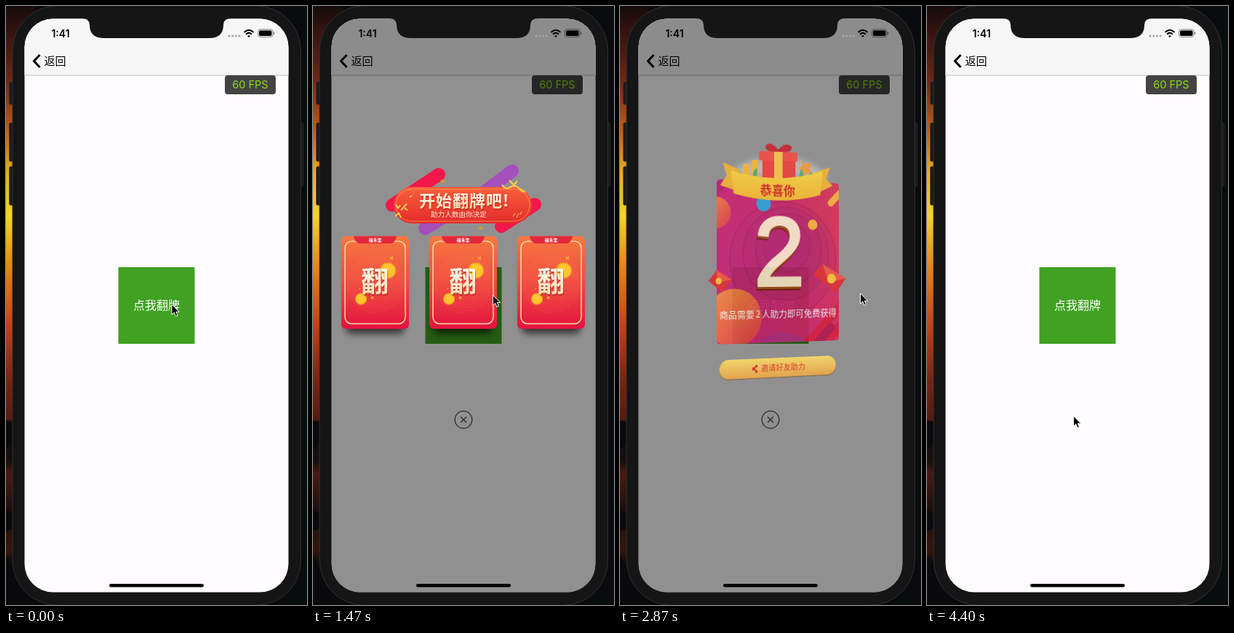
An HTML page that plays this animation: 414 by 821 pixels, repeating every 4470 ms.

```html
<!DOCTYPE html>
<html lang="zh">
<head>
<meta charset="utf-8">
<style>
html, body { margin: 0; width: 100%; height: 100%; overflow: hidden; background: #0a0a0b; }
body { position: relative; font-family: "Noto Sans CJK SC", "Noto Sans CJK", "Noto Sans", sans-serif; }
div, svg { position: absolute; left: 0; top: 0; width: 414px; height: 821px; }
.screen { clip-path: inset(17.5px 25.5px 17.5px 25.5px round 39px); background: #fefcff; }
#dim { background: #000; }
#front { transform-origin: 327.5px 379px; }
#prize { transform-origin: 207px 344px; }
.latin { font-family: Inter, Roboto, sans-serif; }
</style>
</head>
<body>
<svg id="phone">
  <defs>
    <linearGradient id="fire" x2="0" y2="1">
      <stop offset="0" stop-color="#150c0c"/><stop offset=".05" stop-color="#3a1510"/>
      <stop offset=".12" stop-color="#6a2614"/><stop offset=".2" stop-color="#b4581a"/>
      <stop offset=".28" stop-color="#e9ae22"/><stop offset=".35" stop-color="#f3d32a"/>
      <stop offset=".43" stop-color="#e58a1c"/><stop offset=".53" stop-color="#c2451a"/>
      <stop offset=".62" stop-color="#7a2613"/><stop offset=".69" stop-color="#571a10"/>
      <stop offset=".695" stop-color="#0d0d10"/><stop offset=".76" stop-color="#17100f"/>
      <stop offset=".78" stop-color="#4a1a10"/><stop offset=".84" stop-color="#1c0f0e"/>
      <stop offset=".91" stop-color="#33160d"/><stop offset=".93" stop-color="#0b0b0d"/>
    </linearGradient>
    <linearGradient id="cardFill" x2="0" y2="1">
      <stop offset="0" stop-color="#f7783f"/><stop offset=".5" stop-color="#f24b41"/><stop offset="1" stop-color="#e4123f"/>
    </linearGradient>
    <linearGradient id="cream" x2="0" y2="1">
      <stop offset=".2" stop-color="#fffaf0"/><stop offset="1" stop-color="#ffd9a8"/>
    </linearGradient>
    <linearGradient id="pill" x2="0" y2="1">
      <stop offset="0" stop-color="#f9603c"/><stop offset="1" stop-color="#e22a2b"/>
    </linearGradient>
    <linearGradient id="gold" x2="0" y2="1">
      <stop offset="0" stop-color="#ffdf62"/><stop offset="1" stop-color="#eda644"/>
    </linearGradient>
    <linearGradient id="ribbon" x2="0" y2="1">
      <stop offset="0" stop-color="#fdd63a"/><stop offset="1" stop-color="#f7b92c"/>
    </linearGradient>
    <linearGradient id="panel" x2="1" y2="-.3">
      <stop offset="0" stop-color="#c91f74"/><stop offset=".5" stop-color="#cf2160"/><stop offset="1" stop-color="#df3550"/>
    </linearGradient>
    <linearGradient id="sun" x2="1" y2="1">
      <stop offset="0" stop-color="#f9953a"/><stop offset="1" stop-color="#e32d4a"/>
    </linearGradient>
    <pattern id="dots" width="3" height="3" patternUnits="userSpaceOnUse" patternTransform="rotate(45)">
      <circle cx="1.5" cy="1.5" r=".6" fill="#ffb070"/>
    </pattern>
    <filter id="blur" x="-50%" y="-50%" width="200%" height="200%"><feGaussianBlur stdDeviation="5"/></filter>
    <clipPath id="panelClip"><rect x="113" y="232" width="188" height="229" rx="5"/></clipPath>

    <g id="card">
      <rect x="6" y="20" width="81" height="114" rx="8" fill="#000" opacity=".6" filter="url(#blur)"/>
      <rect width="93" height="127" rx="6" fill="url(#cardFill)"/>
      <circle cx="47" cy="66" r="40" fill="url(#dots)" opacity=".45"/>
      <rect x="5" y="7" width="83" height="113" rx="9" fill="none" stroke="#ffdba6" stroke-width="1.5"/>
      <path d="M17 0H76Q74 10 67 10H26Q19 10 17 0Z" fill="#e3263a"/>
      <text x="46.5" y="7.8" font-size="6" font-weight="700" fill="#fff" text-anchor="middle">福禾里</text>
      <g fill="#ffc52e" stroke="#f59a20" stroke-width="1.5">
        <circle cx="64" cy="47" r="10.5"/><circle cx="27" cy="86" r="7.5"/>
      </g>
      <path d="M67 28l4 4m0-4l-4 4M41 83l3 3m0-3l-3 3M59 30h1M25 72h1" stroke="#ffb52e" stroke-width="1.3"/>
      <text x="47" y="77" font-size="38" font-weight="700" fill="#a32516" opacity=".55" text-anchor="middle">翻</text>
      <text x="46" y="75.5" font-size="38" font-weight="700" fill="url(#cream)" text-anchor="middle">翻</text>
    </g>
  </defs>
  <rect width="40" height="821" fill="url(#fire)"/>
  <path d="M0 568l9 4v28l-9 8M0 690l9 6v20l-9 4M0 752l30 69H0Z" fill="#0a0a0c"/>
  <rect x="374" width="40" height="821" fill="#080c0d"/>
  <g fill="#1b1b1c" stroke="#303031" stroke-width=".6">
    <rect x="4.500" y="104" width="8" height="31" rx="2"/><rect x="4.500" y="160" width="8" height="53" rx="2"/>
    <rect x="4.500" y="220" width="8" height="53" rx="2"/><rect x="401" y="160" width="8" height="87" rx="2"/>
  </g>
  <rect x="9" y="-.5" width="396.500" height="822" rx="62" fill="#151516" stroke="#303032"/>
</svg>

<div class="screen">
  <svg id="page">
    <rect y="17" width="414" height="78" fill="#f6f6f6"/>
    <path d="M0 95H414" stroke="#bdbdbf"/>
    <path d="M46.500 67L38.500 75.500L46.500 84" fill="none" stroke="#000" stroke-width="3"/>
    <text x="52.500" y="81.300" font-size="15">返回</text>
    <rect x="154.500" y="358" width="105" height="105" fill="#40a122"/>
    <text x="207" y="416" font-size="16" font-weight="300" fill="#fff" text-anchor="middle">点我翻牌</text>
    <rect x="301" y="95" width="70" height="26" rx="4" fill="#434344"/>
    <text class="latin" x="336" y="113.300" font-size="14.500" fill="#8ede0c" text-anchor="middle">60 FPS</text>
  </svg>
  <div id="dim"></div>
  <div id="popup">
    <svg id="deal">
      <g stroke-linecap="round" stroke-width="18">
        <path d="M109 273L173 231M259 302L305 272" stroke="#f5164a"/>
        <path d="M230 259L274 226M154 305L190 283" stroke="#a350bb"/>
      </g>
      <rect x="111" y="248" width="190" height="50" rx="25" fill="url(#pill)"/>
      <rect x="114" y="251" width="184" height="44" rx="22" fill="none" stroke="#ff9b50" stroke-width=".8"/>
      <g fill="none" stroke="#ffcf4a" stroke-width="2">
        <path d="M260 245q5 8 12 3t16 7M270 239l6 6l5-5M284 250l8 5"/>
        <path d="M114 272l3 5l3-4M121 280l8-9M113 288l5-4l3 6M126 277l4 3M133 262l3-2"/>
        <path d="M275 289l3-5m2 6l3-6m2 2l2-4" stroke-width="1"/>
      </g>
      <path d="M176 239h5v3h-5zM228 303h5v3h-5zM196 242l3-3M234 241l3 2M180 305l4-2" fill="#c79a35" stroke="#c79a35"/>
      <text x="147" y="276.500" font-size="22" font-weight="900" letter-spacing="1" fill="#b3281c" opacity=".6">开始翻牌吧!</text>
      <text x="146" y="275" font-size="22" font-weight="900" letter-spacing="1" fill="url(#cream)">开始翻牌吧!</text>
      <text x="162" y="289.300" font-size="9.600" fill="#ffe9d6">助力人数由你决定</text>
      <use href="#card" x="39" y="315.500"/><use href="#card" x="160" y="315.500"/>
    </svg>
    <svg id="front"><use href="#card" x="281" y="315.500"/></svg>
    <svg id="prize">
      <path d="M130 228Q150 200 205 198T285 226Z" fill="#fff" opacity=".4" filter="url(#blur)"/>
      <g clip-path="url(#panelClip)">
        <rect x="113" y="232" width="188" height="229" fill="url(#panel)"/>
        <g id="rings" fill="#a01a72" fill-opacity=".17" stroke="#8f1a50" stroke-opacity=".45" stroke-width="1.500"></g>
        <circle cx="112" cy="278" r="22" fill="url(#sun)"/>
        <circle cx="139" cy="425" r="41" fill="url(#sun)"/>
        <path d="M175 461Q205 432 250 461Z" fill="#a82a90" opacity=".6"/>
        <g stroke-linecap="round" stroke-width="13">
          <path d="M250 465L306 409M276 466L306 438" stroke="#d9153a"/>
          <path d="M268 462L288 442" stroke="#b4124a"/>
          <path d="M288 261L303 246" stroke="#f8b03a" stroke-width="10"/>
          <path d="M113 246L124 236" stroke="#b51c70"/>
        </g>
        <circle cx="183" cy="264" r="11" fill="#2b9fd8"/>
        <circle cx="259" cy="293" r="7.500" fill="#f8b133"/>
      </g>
      <g fill="#f5b93a">
        <path d="M152 209h10v22h-10zM165 203h10v28h-10z"/>
        <path d="M241 201l7 5l9-2l-3 8l5 8l-9-1l-7 6l-1-9l-7-4l7-3z" fill="#f59a3a"/>
        <path d="M148 224q-2-8-6-9q0 8 3 11zM166 228q1-11 6-14q3 8-1 15zM238 228q-1-10 4-15q4 8 1 16zM250 228q2-8 8-11q0 8-4 12z" fill="#4dae74"/>
      </g>
      <path d="M205 190Q184 192 186 182Q193 174 205 187Q217 174 226 182Q228 192 205 190Z" fill="#c9222c"/>
      <path d="M181 202h51v32h-51z" fill="#ee3d38"/>
      <rect x="176" y="190" width="59" height="13" rx="2" fill="#f64a40"/>
      <path d="M199 190h13v44h-13z" fill="#fbc646"/>
      <path d="M122 208L146 217V248L118 240L128 226ZM287 209L264 217V248L291 236L280 226Z" fill="#f3b42e"/>
      <path d="M134 219Q205 238 275 215L271 250Q205 268 138 251Z" fill="url(#ribbon)"/>
      <text x="204.500" y="252" font-size="18" font-weight="900" fill="#d8231f" text-anchor="middle">恭喜你</text>
      <g id="digit" font-family="'Liberation Sans', Arial, sans-serif" font-size="139" stroke-width="4" text-anchor="middle"></g>
      <g font-size="13" fill="#fff">
        <text x="117" y="425">商品需要</text><text x="174.500" y="425" text-anchor="middle">2</text><text x="180" y="425">人助力即可免费获得</text>
      </g>
      <path d="M101 373L113 358L135 371L121 389Z" fill="#e32a2d"/>
      <path d="M113 358L135 371L114 375Z" fill="#f4523f"/>
      <circle cx="116" cy="373" r="4.500" fill="#fbc531"/>
      <path d="M259 364L275 350L312 371L297 391Z" fill="#e0282d"/>
      <path d="M275 350L312 371L284 377Z" fill="#f4523f"/>
      <circle cx="289" cy="371" r="7" fill="#fbc531"/>
      <rect x="117" y="484.500" width="179" height="27" rx="13.500" fill="#8a5a1c" opacity=".6"/>
      <rect x="117" y="483" width="179" height="27" rx="13.500" fill="url(#gold)"/>
      <path d="M173 493L167.500 497L173 501" fill="none" stroke="#dc3023" stroke-width="1.800"/>
      <g fill="#dc3023"><circle cx="172" cy="493.500" r="2"/><circle cx="168" cy="497" r="2.500"/><circle cx="172" cy="501" r="2"/></g>
      <text x="179" y="501.200" font-size="11.400" font-weight="500" fill="#dc3023">邀请好友助力</text>
    </svg>
    <svg fill="none" stroke="#2b2b2d" stroke-width="1.300">
      <circle cx="207" cy="567" r="11.800"/><path d="M203 563l8 8m0-8l-8 8"/>
    </svg>
  </div>
</div>

<svg>
  <path d="M104 16V17Q115 17 115 26Q115 44 135 44H279Q299 44 299 26Q299 17 310 17V16Z" fill="#151516"/>
  <text class="latin" x="75" y="42.500" font-size="14" font-weight="600" text-anchor="middle">1:41</text>
  <path d="M307 41H323" stroke="#a6a6a8" stroke-width="3.200" stroke-linecap="round" stroke-dasharray="0 4.700"/>
  <g fill="none" stroke="#000" stroke-width="2">
    <path d="M327.500 36Q334 30 340.500 36M330 38.800Q334 35 338 38.800"/>
    <path d="M332 41L334 43L336 41Q334 39.500 332 41Z" fill="#000" stroke="none"/>
  </g>
  <rect x="346.500" y="32" width="20.500" height="10.500" rx="3" fill="none" stroke="#000" stroke-opacity=".45"/>
  <rect x="348" y="33.500" width="17.500" height="7.500" rx="1.800"/>
  <path d="M368.500 35.500v3.500" stroke="#000" stroke-opacity=".5" stroke-width="1.300"/>
  <rect x="142" y="792" width="130" height="4.500" rx="2.200"/>
  <path id="cursor" d="M0 0V14L3.300 11L5.600 16.200L8 15.200L5.800 10.200H10.300Z" fill="#000" stroke="#fff"/>
</svg>

<script>
const $ = id => document.getElementById(id);
const LOOP = 4470, STEP = LOOP / 67, HEIGHT = 821;

// time, x, y of the pointer tip
const PATH = [
  [67, 228, 409], [333, 218, 397], [1200, 218, 397], [2000, 330.5, 394],
  [2930, 330.5, 394], [3530, 204.5, 560], [3930, 204.5, 560], [4060, 201.5, 562]
];

const ease = (t, start, length) => {
  const u = Math.min(1, Math.max(0, (t - start) / length));
  return u * u * (3 - 2 * u);
};

function pointer(t) {
  let [, x, y] = PATH[0];
  for (let i = 1; i < PATH.length; i++) {
    const [t0, x0, y0] = PATH[i - 1], [t1, x1, y1] = PATH[i];
    const k = ease(t, t0, t1 - t0);
    x += (x1 - x0) * k;
    y += (y1 - y0) * k;
  }
  return [x, y];
}

function turn(el, x, y, angle, scale, opacity) {
  el.style.visibility = Math.abs(angle) <= 90 ? 'visible' : 'hidden';
  el.style.opacity = opacity;
  el.style.transform =
    `translate(${x}px, ${y}px) perspective(1300px) rotateY(${angle}deg) scale(${scale})`;
}

function draw(t) {
  const shown = ease(t, 609, 400) - ease(t, 3985, 400);
  $('dim').style.opacity = 0.433 * shown;
  $('popup').style.transform = `translateY(${HEIGHT * (1 - shown)}px)`;

  const flip = ease(t, 2165, 900), rest = 1 - flip;
  $('deal').style.opacity = 1 - ease(t, 2200, 400);
  turn($('front'), -100 * flip, -35 * flip, -180 * flip, 1 - 1.5 * flip + 5 * flip * flip, rest);
  turn($('prize'), 100 * rest, 35 * rest, 180 * rest, 1 - 0.3 * rest, flip);

  $('cursor').setAttribute('transform', `translate(${pointer(t)})`);
}

$('rings').innerHTML = [[214, 343, 82], [218, 335, 66], [222, 329, 51], [219, 325, 36]]
  .map(([x, y, r]) => `<circle cx="${x}" cy="${y}" r="${r}"/>`).join('');

// extruded numeral, back to front
for (let i = 5; i >= 0; i--) {
  const color = i ? (i > 3 ? '#6e1a12' : '#a8451b') : '#ffe6cc';
  $('digit').innerHTML +=
    `<text x="${207.5 - i * 0.3}" y="${380 + i}" fill="${color}" stroke="${color}">2</text>`;
}

function tick(now) {
  const frame = Math.min(66, Math.floor((now % LOOP + 5) / STEP));
  draw(frame * STEP);
  requestAnimationFrame(tick);
}
draw(0);
requestAnimationFrame(tick);
</script>
</body>
</html>
```
